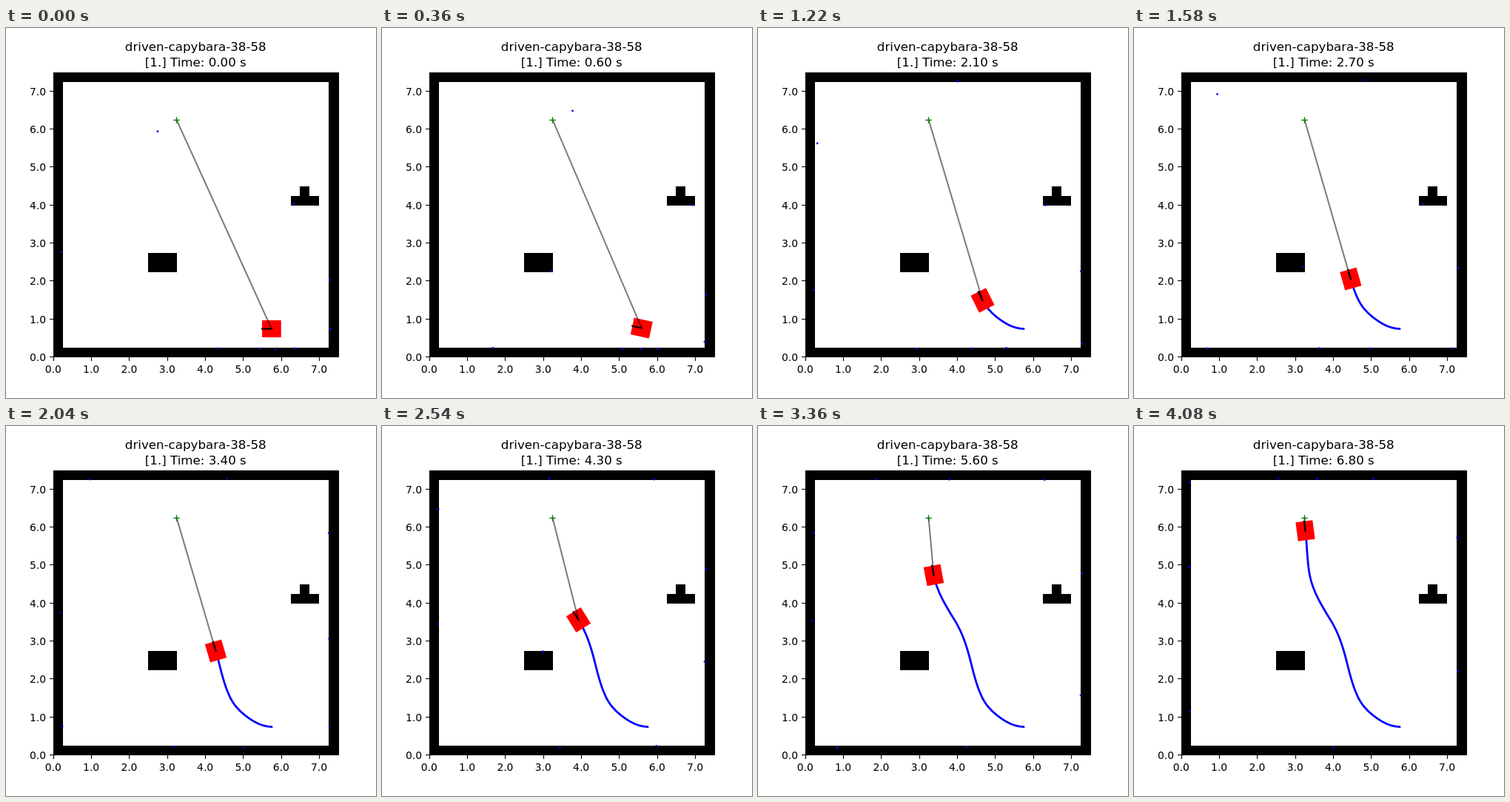
Animation of 500x500 px, one loop 4.18 s. Source, as an HTML page with a canvas:

```html
<!DOCTYPE html>
<html lang="en">
<head>
<meta charset="utf-8">
<title>Robot run</title>
<style>
html, body { margin: 0; width: 100%; height: 100%; overflow: hidden; background: #fff; }
canvas { display: block; }
</style>
</head>
<body>
<canvas id="stage" width="500" height="500"></canvas>
<script>
const ctx = document.getElementById('stage').getContext('2d');
const LOOP = 4180, LAST = 68;
const UNIT = 385 / 7.5, LEFT = 63.75, BOTTOM = 445;
const px = x => LEFT + x * UNIT;
const py = y => BOTTOM - y * UNIT;
const rad = deg => deg * Math.PI / 180;
const target = { x: px(3.25), y: py(6.25) };

// Obstacles as x0, y0, x1, y1 in metres
const blocks = [
  [0, 0, 7.5, .25], [0, 7.25, 7.5, 7.5], [0, 0, .25, 7.5], [7.25, 0, 7.5, 7.5],
  [2.5, 2.25, 3.25, 2.75], [6.25, 4, 7, 4.25], [6.5, 4.25, 6.75, 4.5]
];

// Waypoints: step, x, y, climb angle, pixels per step
const way = [
  [0, 358.9, 406.5, 0, 0],
  [11, 336.5, 400, 29.5, 3.6],
  [21, 303.5, 368, 63.5, 5.1],
  [34, 283.5, 304, 73.8, 5.13],
  [43, 265.5, 262, 58.3, 5.13],
  [56, 237.5, 201.5, 79.3, 5.13],
  [68, 231.5, 141.5, 82.6, 5.1]
];

// Cubic Hermite through the waypoints
function position(step) {
  const i = way.findIndex((w, j) => j === way.length - 2 || step < way[j + 1][0]);
  const [s0, x0, y0, a0, v0] = way[i], [s1, x1, y1, a1, v1] = way[i + 1];
  const d = s1 - s0, u = (step - s0) / d;
  const h = u * u * (3 - 2 * u), g0 = u * (1 - u) ** 2 * d * v0, g1 = u * u * (u - 1) * d * v1;
  return {
    x: x0 + (x1 - x0) * h - g0 * Math.cos(rad(a0)) - g1 * Math.cos(rad(a1)),
    y: y0 + (y1 - y0) * h - g0 * Math.sin(rad(a0)) - g1 * Math.sin(rad(a1))
  };
}

const trail = Array.from({ length: LAST + 1 }, (_, step) => position(step));

function polyline(points, color, width) {
  ctx.strokeStyle = color;
  ctx.lineWidth = width;
  ctx.beginPath();
  points.forEach(p => ctx.lineTo(p.x, p.y));
  ctx.stroke();
}

function text(str, x, y, size, align) {
  ctx.font = `${size}px "DejaVu Sans", sans-serif`;
  ctx.textAlign = align;
  ctx.fillText(str, x, y);
}

function drawAxes(step) {
  ctx.fillStyle = '#000';
  for (const [x0, y0, x1, y1] of blocks) {
    const left = Math.round(px(x0)), top = Math.round(py(y1));
    ctx.fillRect(left, top, Math.round(px(x1)) - left, Math.round(py(y0)) - top);
  }
  ctx.strokeStyle = '#000';
  ctx.lineWidth = 1.11;
  ctx.strokeRect(64.5, 60.5, 385, 384);
  for (let v = 0; v <= 7; v++) {
    const x = Math.round(px(v)) + .5, y = Math.round(py(v)) - .5;
    polyline([{ x, y: 445 }, { x, y: 449.9 }], '#000', 1.11);
    polyline([{ x: 59.1, y }, { x: 64, y }], '#000', 1.11);
    text(v.toFixed(1), px(v), 466, 13.89, 'center');
    text(v.toFixed(1), 54, py(v) + 5, 13.89, 'right');
  }
  text('driven-capybara-38-58', 256.25, 31, 16.67, 'center');
  text(`[1.] Time: ${(step / 10).toFixed(2)} s`, 256.25, 52, 16.67, 'center');
}

// March along a ray until it enters an obstacle or reaches 6 m
function castRay(from, angle) {
  const x0 = (from.x - LEFT) / UNIT, y0 = (BOTTOM - from.y) / UNIT;
  let x, y;
  for (let k = 1; k <= 120; k++) {
    x = x0 + k * .05 * Math.cos(angle);
    y = y0 + k * .05 * Math.sin(angle);
    if (blocks.some(b => x >= b[0] && x <= b[2] && y >= b[1] && y <= b[3])) break;
  }
  return { x: px(x), y: py(y) };
}

function drawRobot(step) {
  const pos = trail[step], next = position(step + .01);
  const heading = Math.atan2(pos.y - next.y, next.x - pos.x);
  ctx.lineCap = 'square';
  ctx.lineJoin = 'round';
  if (step) polyline(trail.slice(0, step + 1), '#00f', 2.78);

  ctx.save();
  ctx.translate(pos.x, pos.y);
  ctx.rotate(-heading);
  ctx.fillStyle = '#f00';
  ctx.fillRect(-.25 * UNIT, -.225 * UNIT, .5 * UNIT, .45 * UNIT);
  ctx.restore();

  polyline([target, pos], 'rgba(0,0,0,.5)', 2.08);
  const nose = {
    x: pos.x + .25 * UNIT * Math.cos(heading),
    y: pos.y - .25 * UNIT * Math.sin(heading)
  };
  polyline([pos, nose], '#000', 2.08);
  ctx.lineCap = 'butt';

  ctx.fillStyle = '#00f';
  for (let deg = -180; deg < 180; deg += 40) {
    const hit = castRay(pos, heading + rad(deg));
    ctx.beginPath();
    ctx.arc(hit.x, hit.y, 1.4, 0, 7);
    ctx.fill();
  }
}

function drawTarget() {
  const x = 230.5, y = 124.5, r = 4.17;
  polyline([{ x: x - r, y }, { x: x + r, y }], '#008000', 1.39);
  polyline([{ x, y: y - r }, { x, y: y + r }], '#008000', 1.39);
}

// Steps alternate between 20 ms and 100 ms
function stepAt(t) {
  return Math.min(LAST, 2 * Math.floor(t / 120) + (t % 120 >= 20 ? 1 : 0));
}

function render() {
  const step = stepAt(performance.now() % LOOP);
  ctx.fillStyle = '#fff';
  ctx.fillRect(0, 0, 500, 500);
  drawAxes(step);
  drawRobot(step);
  drawTarget();
  requestAnimationFrame(render);
}
render();
</script>
</body>
</html>
```
